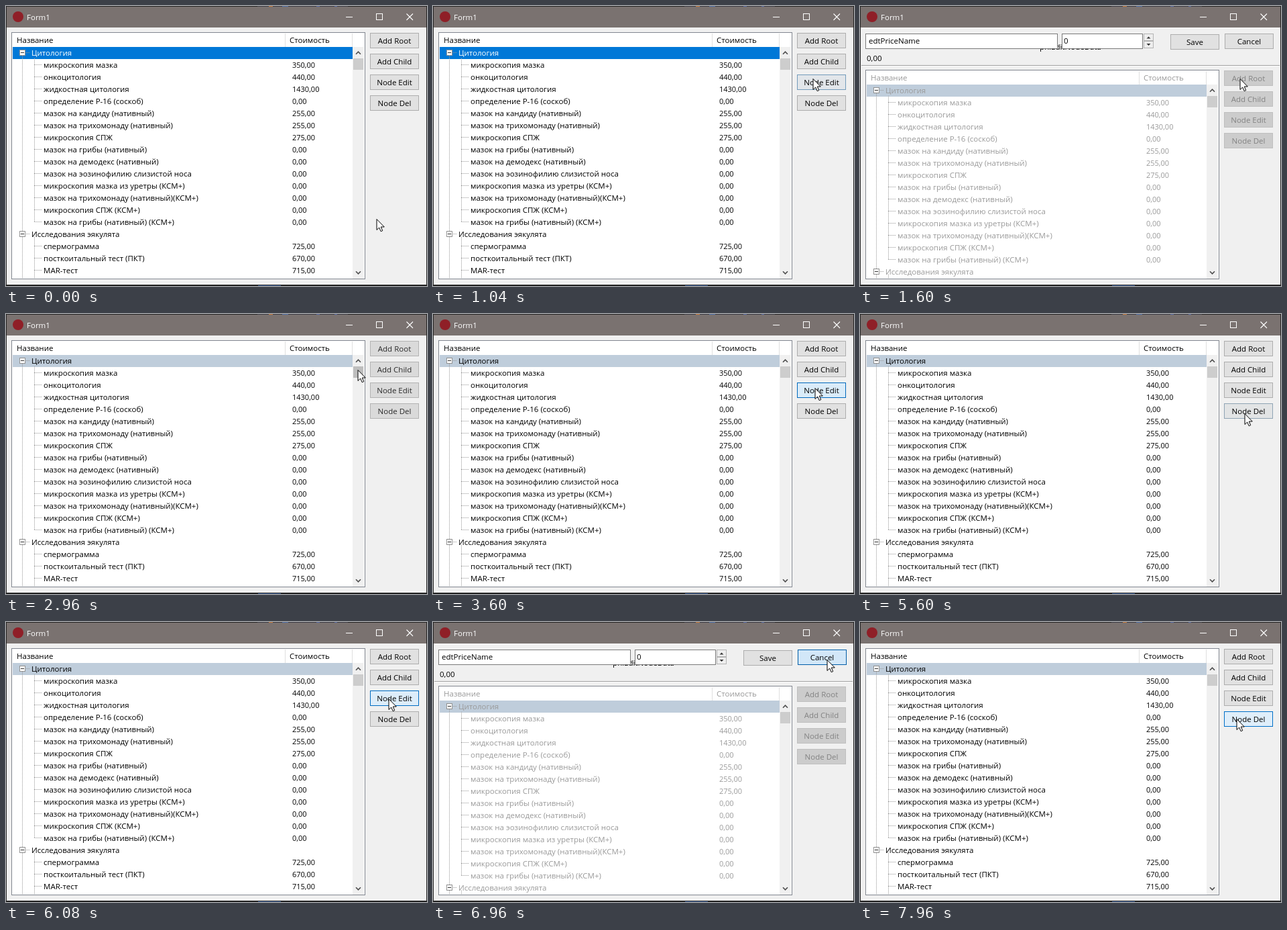
An HTML page for the animation above (8 s loop, 628 px wide and 417 px high).

```html
<!DOCTYPE html>
<html lang="ru">
<head>
<meta charset="utf-8">
<style>
html, body { margin: 0; width: 100%; height: 100%; overflow: hidden; }
svg { display: block; }
text { font: 11.5px "Open Sans", "Noto Sans", sans-serif; white-space: pre; }
.num { font-size: 11px; }
.mid { text-anchor: middle; }
.dots { stroke: #999; stroke-dasharray: 1 1; fill: none; }
rect, .crisp { shape-rendering: crispEdges; }
.off text { fill: #9a9a9a; }
</style>
</head>
<body>
<svg id="stage" width="628" height="417" viewBox="0 0 628 417"></svg>
<script>
const LOOP = 8000, FADE = 240, SHIFT = 56;
const stage = document.getElementById('stage');

const rect = (x, y, w, h, fill, extra = '') =>
  `<rect x="${x}" y="${y}" width="${w}" height="${h}" fill="${fill}" ${extra}/>`;
const box = (x, y, w, h, fill, stroke, extra = '') =>
  rect(x + .5, y + .5, w - 1, h - 1, fill, `stroke="${stroke}" ${extra}`);
const text = (x, y, s, extra = '') => `<text x="${x}" y="${y}" ${extra}>${s}</text>`;
const path = (d, extra) => `<path d="${d}" ${extra}/>`;
const button = (id, x, y, label) =>
  `<g id="${id}">${box(x, y, 73, 23, '#e1e1e1', '#adadad')}${text(x + 36.5, y + 16, label, 'class="mid"')}</g>`;

const rows = [
  ['Цитология'],
  ['микроскопия мазка', '350,00'],
  ['онкоцитология', '440,00'],
  ['жидкостная цитология', '1430,00'],
  ['определение Р-16 (соскоб)', '0,00'],
  ['мазок на кандиду (нативный)', '255,00'],
  ['мазок на трихомонаду (нативный)', '255,00'],
  ['микроскопия СПЖ', '275,00'],
  ['мазок на грибы (нативный)', '0,00'],
  ['мазок на демодекс (нативный)', '0,00'],
  ['мазок на эозинофилию слизистой носа', '0,00'],
  ['микроскопия мазка из уретры (КСМ+)', '0,00'],
  ['мазок на трихомонаду (нативный)(КСМ+)', '0,00'],
  ['микроскопия СПЖ (КСМ+)', '0,00'],
  ['мазок на грибы (нативный) (КСМ+)', '0,00'],
  ['Исследования эякулята'],
  ['спермограмма', '725,00'],
  ['посткоитальный тест (ПКТ)', '670,00'],
  ['MAR-тест', '715,00'],
];

function row([name, price], i) {
  const y = 69 + i * 18;
  if (price) {
    return path(`M42 ${y + .5}H54`, 'class="dots crisp"') +
      text(56, y + 5, name) + text(427, y + 5, price, 'class="num"');
  }
  return path(`M30 ${y + .5}H36`, 'class="dots crisp"') +
    box(20, y - 4, 9, 9, '#fff', '#919191') + rect(22, y, 5, 1, '#333') +
    text(38, y + 5, name, i ? '' : 'id="picked"');
}

const chevron = (y, up) => {
  const k = up ? -3.5 : 3.5;
  return path(`M522 ${y - k / 2}l3.5 ${k}l3.5 ${-k}`, 'fill="none" stroke="#505050" stroke-width="1.7"');
};

const backdrop =
  rect(0, 0, 628, 417, '#242424') +
  rect(375, 0, 135, 1, '#3c3c44') + rect(392, 0, 6, 2, '#c87a3a') +
  rect(412, 0, 9, 2, '#4c6fa8') + rect(463, 0, 5, 2, '#5266a0') +
  rect(490, 0, 4, 2, '#5266a0') + rect(376, 416, 34, 1, '#4c6fa8');

const titleBar =
  rect(1, 1, 626, 32, '#7a7270') +
  '<circle cx="18" cy="16" r="8" fill="#8f1f27"/>' +
  text(31, 20.5, 'Form1', 'fill="#fff"') +
  rect(507, 16, 10, 1, '#fff') + box(552, 11, 10, 10, 'none', '#fff') +
  path('M597.500 11.500l9.500 9.500m0-9.500l-9.500 9.500', 'stroke="#fff" stroke-width="1.1"');

const spinner = y => box(423, y, 15, 11, '#eee', '#b4b4b4');
const editor = '<g id="editor">' +
  rect(2, 33, 624, 1, '#fff') + rect(2, 88, 624, 1, '#a0a0a0') + rect(2, 89, 624, 1, '#fff') +
  text(314, 65, 'pnlEditNodeData', 'class="mid"') +
  box(8, 41, 287, 23, '#fff', '#7a7a7a') + text(13, 56, 'edtPriceName') +
  box(301, 41, 121, 23, '#fff', '#7a7a7a') + text(304, 56, '0') +
  spinner(41) + spinner(52) +
  path('M427.500 48.500h6l-3-3zM427.500 56h6l-3 3z', 'fill="#333"') +
  text(10, 82, '0,00') +
  button('save', 463, 42, 'Save') + button('cancel', 544, 41, 'Cancel') + '</g>';

const list =
  box(8, 39, 528, 400, '#fff', '#828790') +
  '<g id="list">' + text(16, 55, 'Название') + text(423, 55, 'Стоимость') +
  rect(416, 41, 1, 20, '#e0e0e0') + rect(516, 41, 1, 20, '#e0e0e0') +
  rect(10, 61, 507, 18, '#0078d7', 'id="bar"') +
  path('M24.500 74V335M24.500 344V420M42.500 78V321M42.500 344V420', 'class="dots crisp"') +
  rows.map(row).join('') + '</g>' +
  rect(517, 61, 17, 360, '#f0f0f0') + rect(518, 78, 15, 17, '#cdcdcd', 'id="thumb"') +
  chevron(70, true);

stage.innerHTML =
  '<clipPath id="client"><rect width="628" height="406"/></clipPath>' +
  backdrop + titleBar + rect(1, 32, 626, 383, '#f0f0f0') + editor +
  `<g clip-path="url(#client)"><g id="body">${list}` +
  button('root', 543, 40, 'Add Root') + button('child', 543, 71, 'Add Child') +
  button('edit', 543, 102, 'Node Edit') + button('del', 543, 133, 'Node Del') + '</g></g>' +
  rect(517, 389, 17, 17, '#f0f0f0') + chevron(397, false) + rect(8, 406, 528, 1, '#828790') +
  path('M0 .5V16.500L3.700 13L6.200 18.700L8.700 17.600L6.300 12H11.300Z',
    'id="cursor" fill="#fff" stroke="#000" stroke-width="1"');

const el = Object.fromEntries([...stage.querySelectorAll('[id]')].map(e => [e.id, e]));

// Button looks: face, border, label
const looks = {
  normal: [0xe1e1e1, 0xadadad, 0x000000],
  hot: [0xe5f1fb, 0x0078d7, 0x000000],
  press: [0xcce4f7, 0x005499, 0x000000],
  off: [0xcccccc, 0xbfbfbf, 0x838383],
};
const opened = [[1280, 2800], [3680, 5040], [6160, 7040]];
const toggles = opened.flatMap(([a, b]) => [[a, 'off'], [b, 'normal']]);
const withToggles = list => [...toggles, ...list].sort((a, b) => a[0] - b[0]);
const states = {
  root: toggles,
  child: toggles,
  edit: withToggles([[960, 'hot'], [1100, 'press'], [3240, 'hot'], [3500, 'press'],
    [5800, 'hot'], [6000, 'press']]),
  del: withToggles([[5560, 'hot'], [5780, 'normal'], [7640, 'hot'], [7900, 'press']]),
  save: [[2040, 'hot'], [2560, 'press'], [2760, 'normal'], [4720, 'hot'], [4880, 'press'], [5040, 'normal']],
  cancel: [[6620, 'hot'], [6780, 'press'], [7040, 'normal']],
};
const trail = [
  [0, 553, 317], [400, 553, 317], [1000, 567, 108], [1640, 567, 108], [2040, 508, 53],
  [2220, 508, 53], [2400, 490, 51], [2740, 490, 51], [2960, 525, 83], [3240, 570, 110],
  [4380, 570, 110], [4720, 497, 62], [4820, 494, 48], [5200, 493, 47], [5600, 574, 148],
  [5700, 574, 147], [5880, 571, 114], [6240, 571, 114], [6680, 588, 56], [7080, 588, 56],
  [7660, 562, 144], [8000, 562, 144],
];

const mix = (a, b, k) => 'rgb(' + [16, 8, 0].map(s => {
  const from = a >> s & 255, to = b >> s & 255;
  return Math.round(from + (to - from) * k);
}) + ')';

function paintButton(id, t) {
  let prev = 'normal', now = 'normal', since = -FADE;
  for (const [at, state] of states[id]) {
    if (at <= t) { prev = now; now = state; since = at; }
  }
  const k = Math.min(1, (t - since) / FADE);
  const [face, edge, label] = looks[now].map((c, i) => mix(looks[prev][i], c, k));
  const [shape, caption] = el[id].children;
  shape.setAttribute('fill', face);
  shape.setAttribute('stroke', edge);
  caption.setAttribute('fill', label);
}

function draw(t) {
  const open = opened.some(([a, b]) => t >= a && t < b);
  const focused = t < 1100;
  el.editor.style.display = open ? '' : 'none';
  el.body.setAttribute('transform', `translate(0 ${open ? SHIFT : 0})`);
  el.list.setAttribute('class', open ? 'off' : '');
  el.bar.setAttribute('fill', focused ? '#0078d7' : '#bfcddb');
  el.picked.setAttribute('fill', focused ? '#fff' : '#000');
  el.thumb.setAttribute('fill', t > 2900 && t < 3040 ? '#bebebe' : '#cdcdcd');
  for (const id in states) paintButton(id, t);

  const i = trail.findIndex(p => p[0] > t);
  const [t0, x0, y0] = trail[i - 1], [t1, x1, y1] = trail[i];
  const k = (t - t0) / (t1 - t0);
  el.cursor.setAttribute('transform',
    `translate(${Math.round(x0 + (x1 - x0) * k)} ${Math.round(y0 + (y1 - y0) * k)})`);
}

const start = performance.now();
function tick() {
  draw((performance.now() - start) % LOOP);
  requestAnimationFrame(tick);
}
tick();
</script>
</body>
</html>
```
